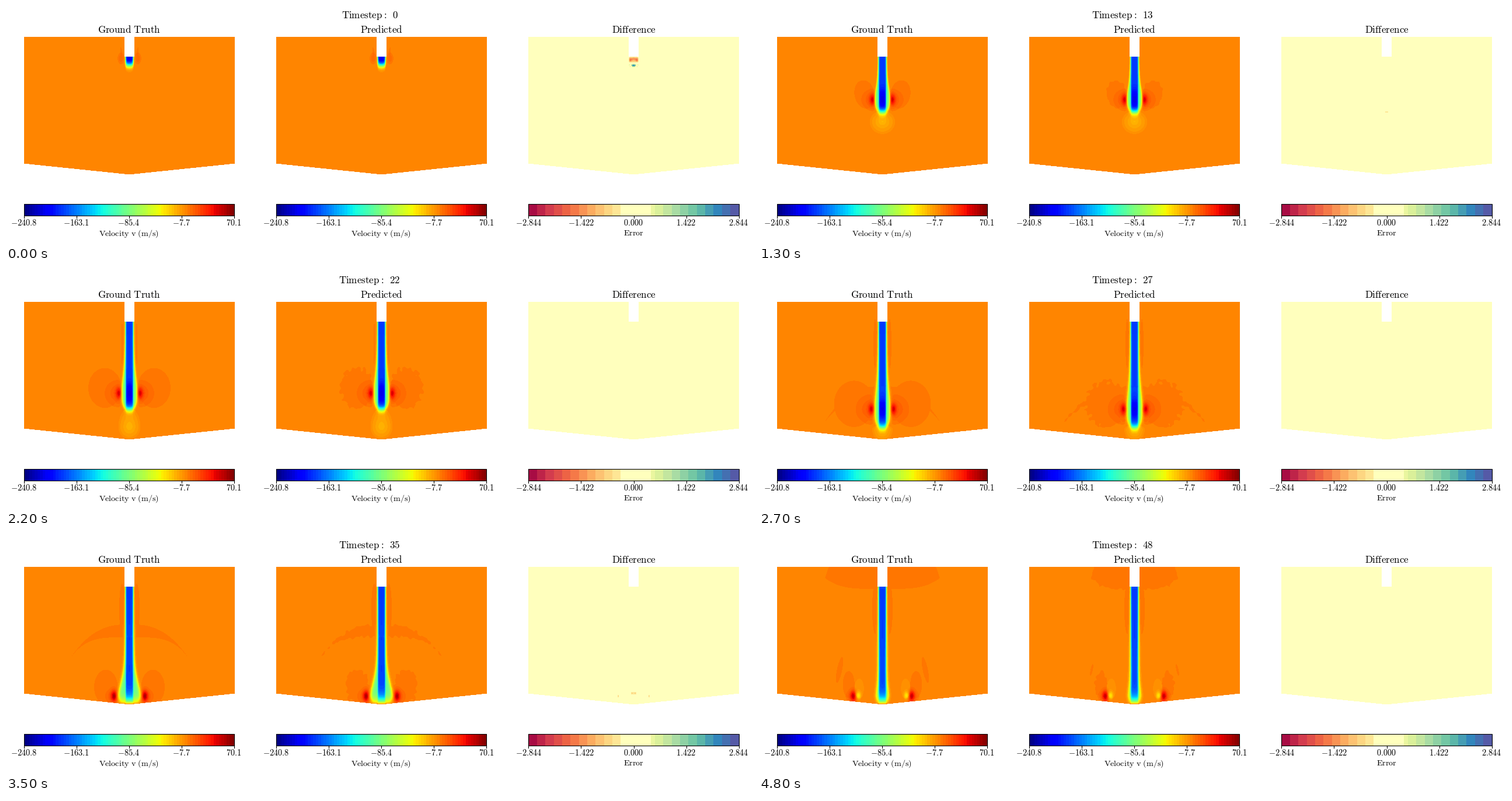
Recreate the animation shown at these times as a matplotlib script. Size 1280 by 407 pixels, loop 4900 ms.

```python
import numpy as np
import matplotlib.pyplot as plt
from matplotlib.animation import FuncAnimation
from matplotlib.colors import ListedColormap
from matplotlib.patches import Rectangle

plt.rcParams["mathtext.fontset"] = "cm"

W, H, DPI = 1280, 407, 80
FRAMES = 49
VMIN, VMAX, EMAX = -240.84, 70.06, 2.844
TOP, FLOOR, WIDTH = 53, 289, 360.2
LEFTS = [30.6 + 432.4 * n for n in range(3)]
LAND = 27  # step at which the jet reaches the floor

# Panel grid: distance from the axis and height in stage pixels
Y, DX = np.mgrid[TOP:FLOOR, -180:180] + 0.5
A = np.abs(DX)
OUTSIDE = (Y > 270.6 + 18 * np.minimum(1, (180 - A) / 173)) | ((A < 8) & (Y < 87))

rng = np.random.default_rng(4)
NOISE = sum(np.sin(kx * A + ky * Y + p)
            for kx, ky, p in rng.uniform(-0.7, 0.7, (8, 3)) * (1, 1, 9)) / 2.8


def ramp(t, start, end):
    return np.clip((t - start) / (end - start), 0, 1)


def pulse(t, centre, half):
    return max(0, 1 - ((t - centre) / half) ** 2)


def mix(a, b, w):
    return a + (b - a) * w


def step(x):
    return 1 / (1 + np.exp(np.clip(x, -60, 60)))


def bell(x, y, sx, sy):
    return np.exp(-((A - x) / sx) ** 2 / 2 - ((Y - y) / sy) ** 2 / 2)


def oval(x, y, rx, ry, tilt=0):
    """Positive inside an ellipse, mirrored about the axis."""
    rx, ry = max(rx, 0.1), max(ry, 0.1)
    return 1 - np.hypot((A - x - tilt * (Y - y)) / rx, (Y - y) / ry)


def tip(t):
    return 102 + 6.17 * t


def vortex(t):
    return 14 + 0.15 * t + 1.65 * max(0, t - 31), min(90 + 5.45 * t, 275)


def jet(t):
    u = Y - vortex(t)[1]
    swell = 6 * ramp(t, 0, 6) * mix(1, 0.5, ramp(t, 38, 48)) + 5 * pulse(t, 35, 6)
    length = 12 + 1.2 * min(t, LAND) - 1.2 * max(t - 28, 0)
    wide = 6.6 + swell * np.exp(-(np.abs(u) / length) ** 1.6)
    soft = 0.6 + 0.006 * np.clip(Y - 87, 0, None)
    body = 85 * step((A - 5.8) / 0.5) + 98 * step((A - wide) / soft)
    body += 32 * (1 - ramp(t, 28, 34)) * np.exp(-(A / 5) ** 4 - (u / 18) ** 2)
    body *= step((Y + 0.05 * A ** 2 - tip(t)) / 3)
    body *= 1 - np.exp(-(FLOOR - Y) / 8.5)
    return -body * ramp(Y, 84, 87)


def lobes(t, near, far, rough):
    """Positive inside the faint zones beside and above the jet."""
    vx, vy = vortex(t)
    wobble = rough * ramp(t, 8, 18) * NOISE
    fall, spread = min(t, LAND), ramp(t, 28, 40)
    zone = oval(mix(13 + 1.3 * fall, vx + 8, spread), mix(vy - 9, 255, spread),
                mix(2 + 1.2 * fall, 10, spread), mix(10 + 1.1 * fall, 23, spread),
                -0.12 * (1 - ramp(t, 12, 20))) + wobble
    zone = np.maximum(zone, oval(12, 125, 5 * ramp(t, 20, 32), 43))
    zone = np.maximum(zone, oval(27, 144 - 9 * (t - 42), 9 * pulse(t, 42, 3),
                                 7 * pulse(t, 42, 3)) + wobble)
    zone = np.maximum(zone, oval(73, 230, 4.5 * ramp(t, 44, 47),
                                 22 * ramp(t, 44, 48), 0.2) - 5 * rough)
    if t >= LAND:
        # reflected wave: a crescent that rises and leaves through the top
        p = ramp(t, LAND, 48)
        q = A / mix(near, far, p)
        end = 262 - 190 * p ** 1.3
        upper, lower = 198 - 238 * p ** 1.7, 225 - 134 * p
        wave = np.minimum(Y - mix(upper, end, q ** 2.6), mix(lower, end, q ** 4) - Y)
        zone = np.maximum(zone, np.where(q < 1, wave / 20 + wobble, -1))
    return zone


def velocity(t, near, far, rough=0):
    x, y = vortex(t)
    size = 6 + 0.3 * t * (1 - ramp(t, 28, 36))
    power = mix(6, 36, ramp(t, 0, 4)) + 22 * pulse(t, 41, 8)
    v = jet(t) + power * bell(x, y, 3.6, 6.5)
    v += 10 * ramp(t, 0, 8) * bell(x + 2, y, size, size)

    zone = lobes(t, near, far, rough)
    v[(v > 0) & (v < 1.7)] = 0
    v += np.where(zone > 0, 2, 0)

    # pale fan pushed ahead of the jet
    fan = ramp(t, 0, 6) * (1 - ramp(t, 28, 32))
    cy = min(99 + 7.67 * t, 272)
    reach = np.where(Y > cy, 21, max(8, cy - tip(t) + 2))
    r = np.hypot(A / (25 - 0.3 * t), (Y - cy) / reach) / max(fan, 0.01)
    v -= np.where((r < 1) & (zone <= 0), 5 + 14 * (1 - r), 0)

    # pale plume and yellow core trailing the spreading vortex
    trail = ramp(t, 34, 40)
    v -= np.where(oval(x - 10, 262, 8 * trail, 17 * trail) > 0, 6, 0)
    return v - 34 * trail * bell(x - 8, 274, 3, 4.5)


def error(t):
    front, (x, y) = tip(t), vortex(t)
    inside = np.exp(-t / 2.5) * step((A - 7) / 0.7)
    e = inside * (1.5 * (0.6 + NOISE) * np.exp(-((Y - front) / 2.5) ** 2)
                  - 1.25 * (1 + 0.5 * NOISE) * np.exp(-((Y - front + 10) / 5) ** 4))
    size = max(1, 5 - 0.2 * t)
    e -= 0.9 * ramp(t, 0, 2) * (1 - 0.03 * t) * bell(0, front, size, size / 2)
    e += 0.9 * pulse(t, 6, 5) * (bell(11, front - 12, 2, 1.5) + bell(5, front - 31, 0.6, 2))
    e -= 0.75 * pulse(t, 34, 4) * (bell(2, 270, 2, 1.6) + bell(x, y, 1, 1.6))
    return e + 0.95 * pulse(t, 42, 4) * bell(x - 5, y + 1, 1.3, 2)


def text(x, y, s, size):
    return ax.text(x, y, s, fontsize=size * 72 / DPI, ha="center", va="baseline")


def roman(s):
    return r"$\mathrm{%s}$" % s.replace(" ", r"\ ")


def show(data, x, top, bottom, cmap, lo, hi):
    return ax.imshow(data, cmap=cmap, vmin=lo, vmax=hi, aspect="auto",
                     interpolation="nearest", extent=(x, x + WIDTH, bottom, top))


def colorbar(x, cmap, lo, hi, fmt, label):
    top, bottom = 340, 359.6
    show(np.linspace(lo, hi, 360)[None], x, top, bottom, cmap, lo, hi)
    ax.add_patch(Rectangle((x, top), WIDTH, bottom - top, fill=False, lw=1))
    for f in np.linspace(0, 1, 5):
        tx = x + f * WIDTH
        ax.plot((tx, tx), (bottom, bottom + 4), color="black", lw=1)
        text(tx - 0.3, 377, "$%s$" % (fmt % mix(lo, hi, f)), 14.3)
    text(x + WIDTH / 2 - 0.3, 394.5, roman(label), 14.2)


def bands(name, count):
    return plt.get_cmap(name)((np.arange(count) + 0.5) / count)


SPEED = ListedColormap(bands("jet", 80))
tones = np.repeat(bands("Spectral", 25), 2, axis=0)
tones[22:29] = (1, 1, 0.745, 1)
ERROR = ListedColormap(tones)

fig = plt.figure(figsize=(W / DPI, H / DPI), dpi=DPI, facecolor="white")
ax = fig.add_axes([0, 0, 1, 1])
ax.axis("off")

panels = []
for x, title in zip(LEFTS, ("Ground Truth", "Predicted", "Difference")):
    if title == "Difference":
        scale, fmt, label = (ERROR, -EMAX, EMAX), "%.3f", "Error"
    else:
        scale, fmt, label = (SPEED, VMIN, VMAX), "%.1f", "Velocity v (m/s)"
    panels.append(show(np.zeros_like(Y), x, TOP, FLOOR, *scale))
    colorbar(x, *scale, fmt, label)
    text(x + WIDTH / 2, 46, roman(title), 17)
counter = text(623.1, 21, "", 17)
ax.set_xlim(0, W)
ax.set_ylim(H, 0)


def draw(t):
    fields = velocity(t, 100, 98), velocity(t, 122, 74, 0.11), error(t)
    for panel, field in zip(panels, fields):
        panel.set_data(np.where(OUTSIDE, np.nan, field))
    counter.set_text(r"$\mathrm{Timestep}\:\!:\;\!\ %d$" % t)
    return panels + [counter]


anim = FuncAnimation(fig, draw, frames=FRAMES, interval=100, repeat=True,
                     repeat_delay=0, blit=False)
plt.show()
```
